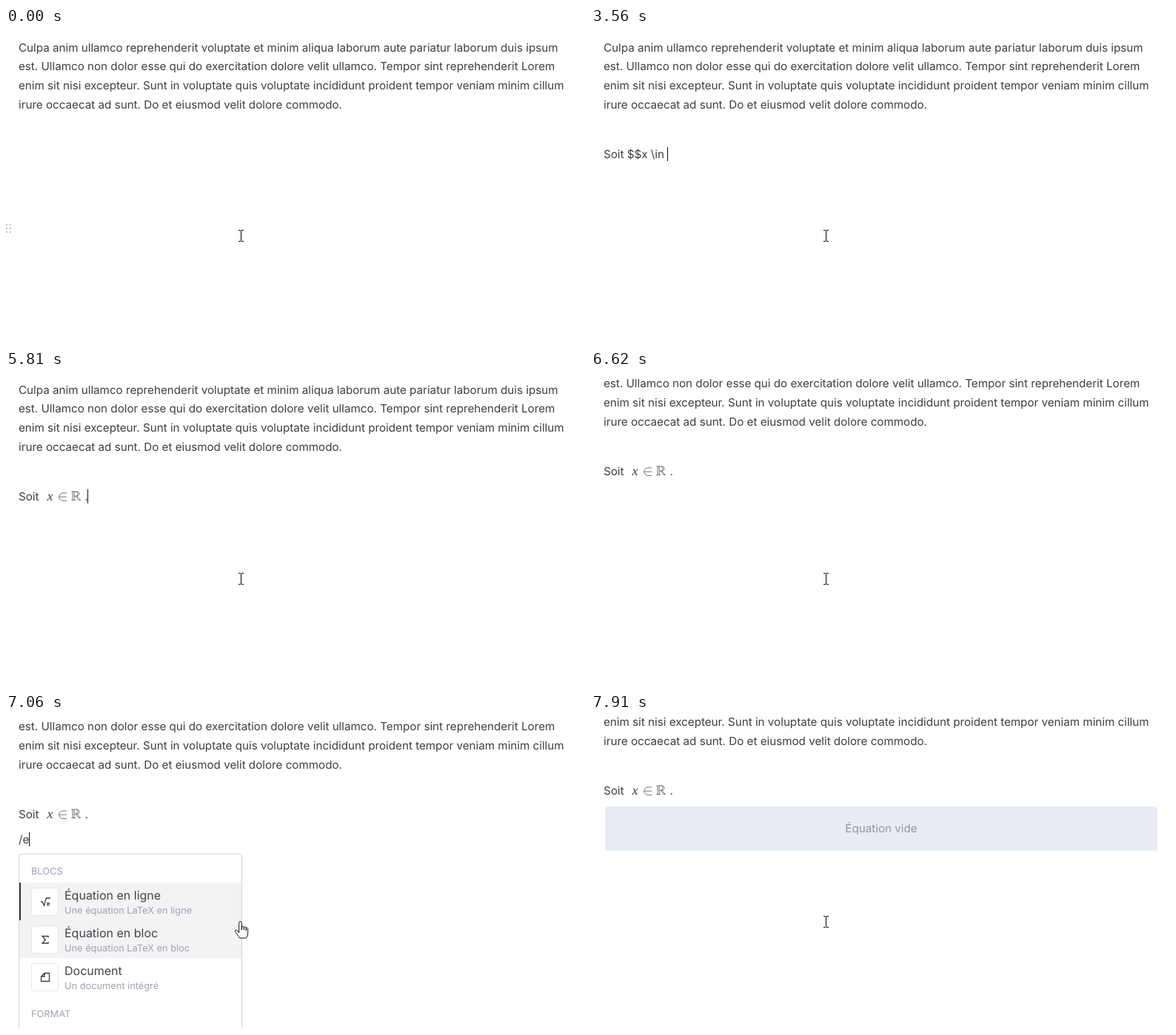
Animation of 782x426 px, one loop 7.99 s. Source, as an HTML page:

```html
<!DOCTYPE html>
<html lang="fr">
<head>
<meta charset="utf-8">
<title>Équations dans l'éditeur</title>
<style>
  html, body { margin: 0; width: 100%; height: 100%; overflow: hidden; background: #fff; }
  svg { display: block; }
  text { font: 400 15.2px Inter, sans-serif; fill: #3e3e42; white-space: pre; text-rendering: geometricPrecision; }
  .math text { font: italic 18px "Liberation Serif", serif; }
  .math path { fill: none; stroke: #3e3e42; stroke-width: .7; }
  .menu text { font-size: 16px; fill: #33353e; }
  .menu .note { font-size: 12.8px; fill: #979bb1; }
  .panel { fill: #fff; stroke: #d3d4d8; filter: drop-shadow(0 1px 2px rgba(0, 0, 0, .05)); }
  .row { fill: #f2f2f3; }
  .bar { fill: #222429; }
  .tile { fill: #fff; stroke: #e6e6e9; }
  .icon { fill: none; stroke: #2b2d36; stroke-width: 1.3; }
  .empty rect { fill: #e8ecf8; }
  .empty text { fill: #9297a3; text-anchor: middle; }
  .handle { fill: #c4c4c6; }
</style>
</head>
<body>
<svg width="782" height="426" viewBox="0 0 782 426">
  <g id="page">
    <text x="17" y="32">Culpa anim ullamco reprehenderit voluptate et minim aliqua laborum aute pariatur laborum duis ipsum</text>
    <text x="17" y="57">est. Ullamco non dolor esse qui do exercitation dolore velit ullamco. Tempor sint reprehenderit Lorem</text>
    <text x="17" y="83">enim sit nisi excepteur. Sunt in voluptate quis voluptate incididunt proident tempor veniam minim cillum</text>
    <text x="17" y="109">irure occaecat ad sunt. Do et eiusmod velit dolore commodo.</text>
    <text id="line" x="17" y="176"></text>
    <g id="math" class="math" transform="translate(0 176)">
      <text x="55.5" y="0">x</text>
      <path d="M82-10H77A5.25 5.25 0 0 0 77 .5H82M71.8-4.8H82"/>
      <path d="M88.3-12H95.5C100-12 100-5.8 95.5-5.8H92.2M90-12V-.4M92.2-12V-.4M88.3-.4H94M94-5.8L98.2-.4H101M95.8-5.8L100.2-.4M95-12C97.3-11 97.3-7 95-5.8"/>
    </g>
    <text id="dot" x="106.5" y="176">.</text>
    <text id="command" x="17" y="210"></text>
    <g id="empty" class="empty">
      <rect x="19" y="192" width="746" height="60" rx="3"/>
      <text x="392" y="227">Équation vide</text>
    </g>
    <rect id="caret" width="1" fill="#111"/>
  </g>

  <g id="menu" class="menu">
    <rect id="panel" class="panel" x="17.5" y="189.5" width="301" rx="3.5"/>
    <text class="note" x="34" y="217">BLOCS</text>
    <g id="items"></g>
    <text id="format" class="note" x="34" y="410">FORMAT</text>
  </g>

  <g id="handle" class="handle"></g>
  <path id="beam" d="M314 273.5h3M318 273.5h3M317.5 274v14M314 288.5h3M318 288.5h3" stroke="#000" fill="none" shape-rendering="crispEdges"/>
  <path id="hand" fill="#fff" stroke="#111" stroke-linejoin="round" d="M314.7 296V282.5q0-2 1.8-2t1.8 2V292V288.5q0-1.3 1.5-1.3t1.6 1.6V292V288.8q.2-1 1.4-1t1.5 1.6V293V289.6q.3-.8 1.2-.6t1.2 1.7V297q0 3-2.3 6H315.5q-1-2.5-3.5-5.2l-2.3-3.2q-.6-2 .9-2.3t2.2 1.7z"/>
</svg>
<script>
const LOOP = 7990;
const RENDER = 5280, DOT = 5810, ENTER = 6050, OPEN = 6860, FILTER = 7140, ARROW = 7540, INSERT = 7910;
const $ = id => document.getElementById(id);
const [page, line, math, dot, command, empty, caret, menu, panel, items, format, handle, beam, hand] =
  ['page', 'line', 'math', 'dot', 'command', 'empty', 'caret', 'menu', 'panel', 'items', 'format', 'handle', 'beam', 'hand'].map($);

// Time, text before the caret, caret hidden
const typing = [
  [0, '', 1], [380, 'S'], [450, 'So'], [740, 'Soi'], [940, 'Soit'], [1140, 'Soit '],
  [1470, 'Soit $'], [1590, 'Soit $$'], [2120, 'Soit $$', 1], [2160, 'Soit $$x'],
  [2480, 'Soit $$x '], [2680, 'Soit $$x \\'], [3120, 'Soit $$x \\i'], [3200, 'Soit $$x \\in'],
  [3560, 'Soit $$x \\in '], [4090, 'Soit $$x \\in ', 1], [4170, 'Soit $$x \\in \\'],
  [4380, 'Soit $$x \\in \\R'], [4910, 'Soit $$x \\in \\R', 1], [5120, 'Soit $$x \\in \\R$'],
  [RENDER, 'Soit'], [ENTER, ''], [6620, '', 1], [6830, '/'], [7020, '/e'],
  [FILTER, '/eq'], [7670, '/eq', 1], [INSERT, '', 1]
];
const scroll = [[0, 0], [RENDER, -1], [ENTER, -35], [INSERT, -67]];

const entries = [
  ['Équation en ligne', 'Une équation LaTeX en ligne', 'M47 254h2l2.5 5 2.7-10H60M55.3 255l3.6 4M58.9 255l-3.6 4'],
  ['Équation en bloc', 'Une équation LaTeX en bloc', 'M57 251.5v-2H49l4.2 4.7-4.2 4.8h8v-2'],
  ['Document', 'Un document intégré', 'M52 248.5h6.5v11h-11v-6.5zM52 248.5v4.5h-4.5']
];
items.innerHTML = entries.map(([title, note, icon], i) => `
  <g transform="translate(0 ${i * 51})">
    ${i < 2 ? '<rect class="row" x="18" y="228" width="300" height="51"/><rect class="bar" x="18" y="228" width="2" height="51"/>' : ''}
    <rect class="tile" x="34.5" y="235.5" width="36" height="37" rx="3.5"/>
    <path class="icon" d="${icon}"/>
    <text x="79" y="251">${title}</text>
    <text class="note" x="79" y="270">${note}</text>
  </g>`).join('');
const rows = items.querySelectorAll('.row'), bars = items.querySelectorAll('.bar');

for (let i = 0; i < 6; i++)
  handle.innerHTML += `<circle cx="${.8 + i % 2 * 5}" cy="${266 + (i >> 1) * 5}" r="1.2"/>`;

const at = (list, t) => list.findLast(step => step[0] <= t);
const show = (node, on) => node.setAttribute('visibility', on ? 'visible' : 'hidden');
const clamp = v => Math.max(0, Math.min(1, v));
const set = (node, attrs) => { for (const key in attrs) node.setAttribute(key, attrs[key]); };
const write = (node, text) => { if (node.textContent !== text) node.textContent = text; };

function placeCaret(t, hidden) {
  let x, y = 161, height = 19;
  if (t >= RENDER && t < DOT) {
    [x, y, height] = [104, 158, 26];
  } else if (t >= DOT && t < ENTER) {
    x = 110;
  } else {
    const field = t < RENDER ? line : command;
    x = Math.floor(17 + (field.textContent ? field.getComputedTextLength() : 0));
    if (t >= ENTER) y = 195;
  }
  set(caret, { x, y, height });
  show(caret, !hidden);
}

function draw(t) {
  const [, text, hidden] = at(typing, t);
  set(page, { transform: `translate(0 ${at(scroll, t)[1]})` });
  write(line, t < RENDER ? text : 'Soit');
  write(command, t < ENTER ? '' : text);
  show(math, t >= RENDER);
  show(dot, t >= DOT);
  show(empty, t >= INSERT);
  placeCaret(t, hidden);

  const open = t >= OPEN && t < INSERT;
  const filtered = t >= FILTER;
  menu.style.display = open ? '' : 'none';
  set(menu, { opacity: 1 - (1 - clamp((t - OPEN) / 280)) ** 2 });
  set(panel, { height: filtered ? 149 : 260 });
  show(items.lastElementChild, !filtered);
  show(format, !filtered);

  const moved = clamp((t - ARROW) / 200);
  set(rows[0], { opacity: 1 - moved });
  set(bars[0], { opacity: 1 - moved });
  set(bars[1], { opacity: moved });

  show(beam, !open);
  show(hand, open);
  set(handle, { opacity: t < 120 ? 1 : t < 200 ? .5 : 0 });
}

const start = performance.now();
function tick() {
  draw((performance.now() - start) % LOOP);
  requestAnimationFrame(tick);
}
tick();
</script>
</body>
</html>
```
